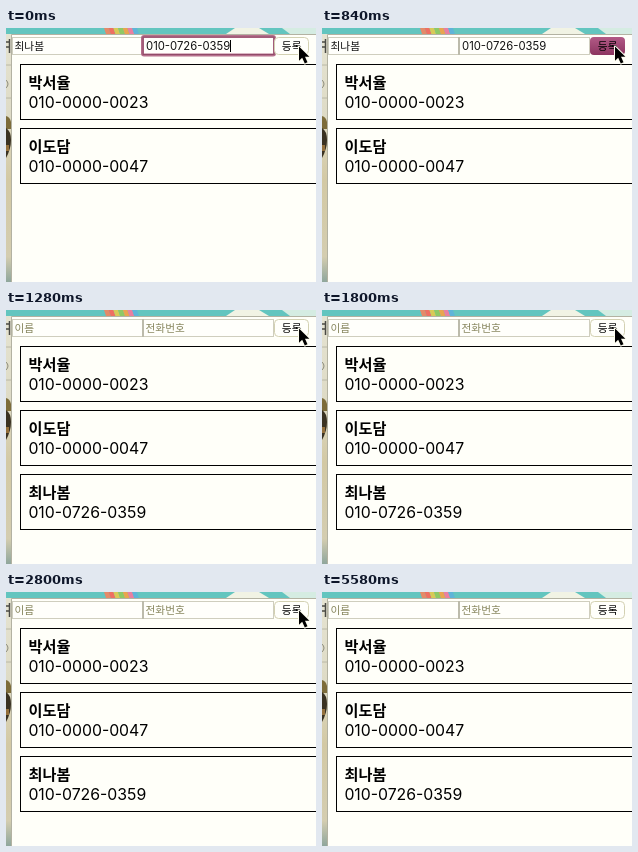
These frames come from a looping animation (310x254 px, 6.88 s). An HTML page:

```html
<!DOCTYPE html>
<html lang="ko">
<head>
<meta charset="utf-8">
<title>연락처</title>
<style>
  html, body { margin: 0; width: 100%; height: 100%; overflow: hidden; background: #fffff9; }
  svg { display: block; width: 310px; height: 254px; }
  text { font-family: Inter, "Noto Sans CJK KR", "Noto Sans CJK", sans-serif; fill: #111; white-space: pre; }
  .name { font: 700 15.2px "Noto Sans CJK KR", "Noto Sans CJK", sans-serif; fill: #000; }
  .phone { font-size: 15.8px; fill: #000; }
  .ko { font-family: "Noto Sans CJK KR", "Noto Sans CJK", sans-serif; font-size: 10.7px; }
  .hint { fill: #86855c; }
  .label { font-weight: 500; fill: #000; }
  .num { font-size: 11.3px; }
  .box { fill: #fffffb; stroke: #cfcebe; }
</style>
</head>
<body>
<svg viewBox="0 0 310 254">
  <defs>
    <linearGradient id="press" x2="0" y2="1">
      <stop offset="0" stop-color="#b25a86"/>
      <stop offset="1" stop-color="#8c3560"/>
    </linearGradient>
    <linearGradient id="side" x2="0" y2="1">
      <stop offset="0" stop-color="#e6e4d2"/>
      <stop offset=".34" stop-color="#dedbc6"/>
      <stop offset=".6" stop-color="#d3c9a4"/>
      <stop offset=".9" stop-color="#d4cdb0"/>
      <stop offset="1" stop-color="#8fa69c"/>
    </linearGradient>
  </defs>

  <rect width="310" height="254" fill="#fffff9"/>

  <!-- desktop behind the window -->
  <rect width="6" height="254" fill="url(#side)"/>
  <path d="M0 14h3M0 19h3M3.5 11v14" stroke="#4a4a44" stroke-width="1.5" fill="none"/>
  <path d="M0 37h5M0 70h5" stroke="#b9b8a6"/>
  <path d="M0 52q4 4 0 8" stroke="#8d8c7e" fill="none"/>
  <path d="M0 88q4 1 5 6v7H0z" fill="#7d6c3a"/>
  <path d="M0 100q5 3 5 12t-5 18z" fill="#3a3222"/>
  <path d="M0 117h3v6H0z" fill="#94703c"/>
  <rect width="310" height="6" fill="#63c5bf"/>
  <g id="stripes"></g>
  <path d="M220 6l9-6h24l10 6z" fill="#f1f3e4"/>
  <path d="M276 0h34v6h-26z" fill="#d5ece2"/>
  <path d="M5.5 254V6.5H310" stroke="#b3b2a2" fill="none"/>

  <!-- form -->
  <rect class="box" x="6.5" y="9.5" width="130" height="17"/>
  <rect class="box" x="137.5" y="9.5" width="130" height="17"/>
  <path d="M137 9v18" stroke="#a9a898"/>
  <g id="hints">
    <text class="ko hint" x="8.5" y="22">이름</text>
    <text class="ko hint" x="139.5" y="22">전화번호</text>
  </g>
  <g id="typed">
    <text class="ko" id="inName" x="8.5" y="22"></text>
    <text class="num" id="inPhone" x="140" y="22"></text>
  </g>
  <g id="focus">
    <rect x="136.5" y="8.5" width="132" height="18.5" rx="1.5" fill="none" stroke="#b5708c" stroke-width="3"/>
    <rect x="137" y="9" width="131" height="17.5" fill="none" stroke="#914a68"/>
    <rect id="caret" y="12" width="1" height="12" fill="#000"/>
  </g>
  <rect x="268.5" y="9.5" width="34" height="17" rx="4" fill="#fffffb" stroke="#d3d1b2"/>
  <rect id="pressed" x="268" y="9" width="35" height="18" rx="4" fill="url(#press)"/>
  <text class="ko label" x="275.8" y="22">등록</text>

  <g id="cards"></g>

  <path id="cursor" d="M0 0V14.2L3.2 11.3L5.8 17L8.5 15.8L6 10.2H10.4Z"
        fill="#000" stroke="#fffef0" stroke-width="2" stroke-linejoin="round" paint-order="stroke"/>
</svg>
<script>
const LOOP = 6880;
const PEOPLE = [
  ['박서율', '010-0000-0023'],
  ['이도담', '010-0000-0047'],
  ['최나봄', '010-0726-0359']
];
// start time, visible parts, cursor position
const STEPS = [
  [0,    ['typed', 'focus', 'cursor'],   293, 18.5],
  [760,  ['typed', 'pressed', 'cursor'], 293, 18.5],
  [940,  ['hints', 'card2', 'cursor'],   293, 18.5],
  [4740, ['hints', 'card2', 'cursor'],   305, 14.5],
  [4760, ['hints', 'card2'],             310, 14.5]
];
const PARTS = ['typed', 'focus', 'pressed', 'hints', 'card2', 'cursor'];
const $ = id => document.getElementById(id);

$('stripes').innerHTML = ['#e58a68', '#ef6f62', '#d9c957', '#8fc964', '#e9a54e', '#ea7fa0', '#5fb4d8']
  .map((c, i) => `<path d="M${98 + i * 4.7} 0h4.7l2 6h-4.7z" fill="${c}"/>`).join('');

$('cards').innerHTML = PEOPLE.map(([name, phone], i) => `
  <g id="card${i}" transform="translate(14 ${36 + i * 64})">
    <rect x=".5" y=".5" width="310" height="55" fill="#fffff9" stroke="#000"/>
    <text class="name" x="8.6" y="24">${name}</text>
    <text class="phone" x="8.4" y="44">${phone}</text>
  </g>`).join('');

const [newName, newPhone] = PEOPLE[2];
$('inName').textContent = newName;
$('inPhone').textContent = newPhone;
$('caret').setAttribute('x', Math.round(140 + $('inPhone').getComputedTextLength()));

let shown = null;
function draw(now) {
  const t = now % LOOP;
  const step = STEPS.findLast(s => s[0] <= t);
  if (step !== shown) {
    shown = step;
    const [, on, x, y] = step;
    for (const id of PARTS) $(id).style.display = on.includes(id) ? '' : 'none';
    $('cursor').setAttribute('transform', `translate(${x} ${y})`);
  }
}

const start = performance.now();
function tick() {
  draw(performance.now() - start);
  requestAnimationFrame(tick);
}
tick();
</script>
</body>
</html>
```
